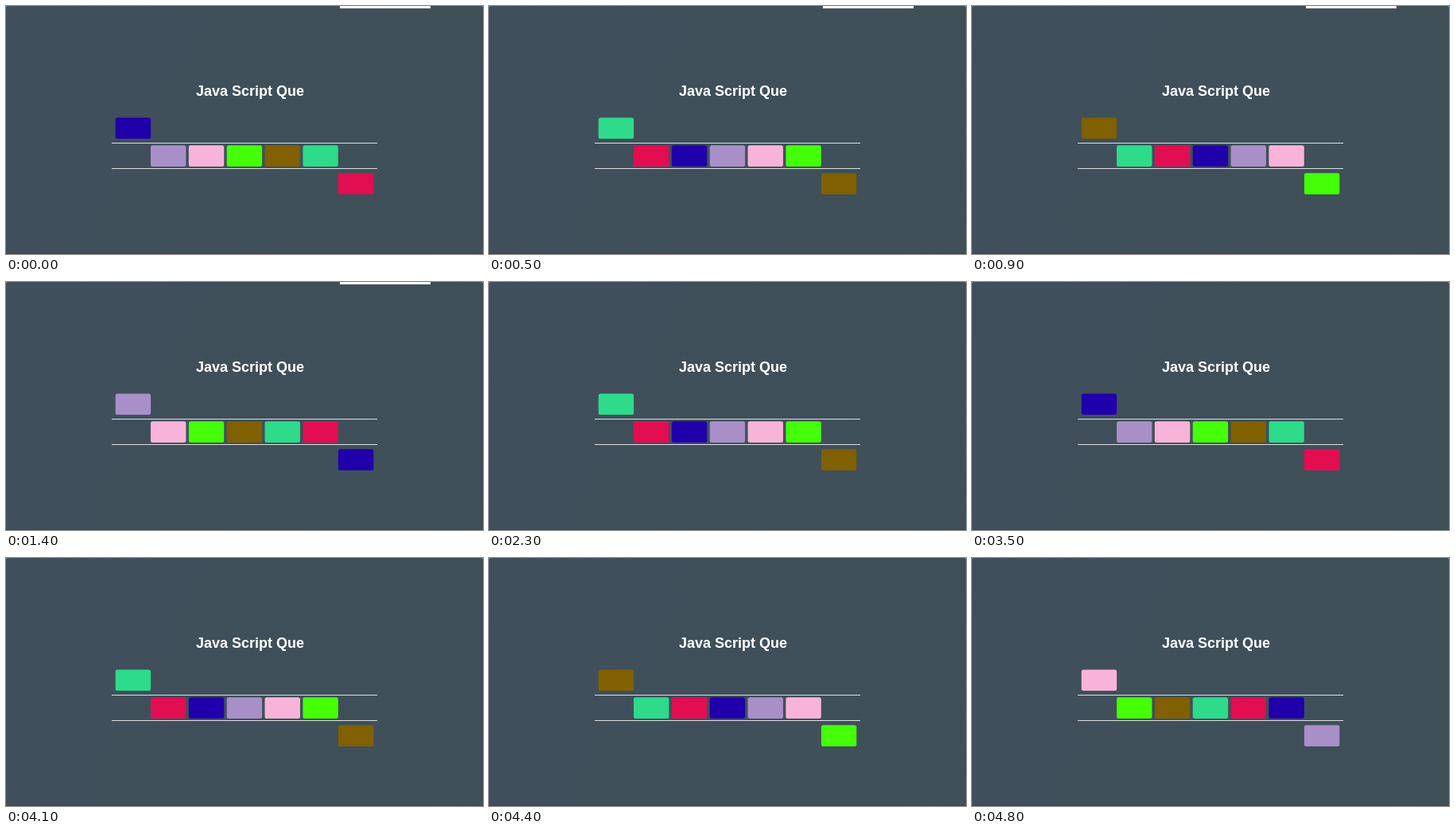
Recreate the animation shown at these times as an HTML page with a canvas. Size 600 px wide and 312 px high, loop 5000 ms.

```html
<!DOCTYPE html>
<html lang="en">
<head>
<meta charset="utf-8">
<title>Java Script Que</title>
<style>
  html, body { margin: 0; width: 100%; height: 100%; overflow: hidden; background: #404f5a; }
  canvas { display: block; width: 600px; height: 312px; }
</style>
</head>
<body>
<canvas id="stage" width="600" height="312"></canvas>
<script>
const ctx = document.getElementById('stage').getContext('2d');
const LOOP = 5000;
const BAR_END = 2200;
const BLOCK = { w: 44.4, h: 26.6, r: 2.5 };
const COLORS = ['#2000aa', '#a98fc8', '#f8b4d8', '#44ff08', '#806000', '#2ddb8b', '#e30d52'];

// Times at which the queue advances by one place
const TICKS = [100, 500, 800, 1100, 1200, 1400, 1700, 1800, 2200, 2600, 2900,
  3200, 3300, 3500, 3800, 4100, 4300, 4500, 4700];

// Waiting block, five queued blocks, released block
const SLOTS = [
  [137.7, 140.5],
  ...Array.from({ length: 5 }, (_, i) => [182 + i * 47.85, 175.3]),
  [417.9, 210.3]
];

function rect(x, y, w, h, color) {
  ctx.fillStyle = color;
  ctx.fillRect(x, y, w, h);
}

function drawBackground() {
  const shade = ctx.createLinearGradient(0, 0, 600, 312);
  shade.addColorStop(0, '#404f5c');
  shade.addColorStop(1, '#3f5058');
  rect(0, 0, 600, 312, shade);
  rect(0, 311, 600, 1, '#37454f');
  rect(0, 0, 1, 1, '#a0a7ad');
  rect(599, 0, 1, 1, '#a0a7ad');
}

function drawBlock([x, y], color) {
  ctx.fillStyle = color;
  ctx.beginPath();
  ctx.roundRect(x, y, BLOCK.w, BLOCK.h, BLOCK.r);
  ctx.fill();
}

function draw(t) {
  drawBackground();
  if (t < BAR_END) rect(420, 0, 114, 3, '#fff');

  ctx.fillStyle = '#fff';
  ctx.font = 'bold 18px "Liberation Sans", Arial, sans-serif';
  ctx.textAlign = 'center';
  ctx.fillText('Java Script Que', 307, 113);

  rect(133, 172, 334, 1, '#dde1e4');
  rect(133, 204, 334, 1, '#dde1e4');

  const shift = TICKS.filter(tick => tick <= t).length;
  const count = COLORS.length;
  SLOTS.forEach((slot, i) => {
    drawBlock(slot, COLORS[(i - shift % count + count) % count]);
  });
}

const start = performance.now();
function frame() {
  draw((performance.now() - start) % LOOP);
  requestAnimationFrame(frame);
}
frame();
</script>
</body>
</html>
```
